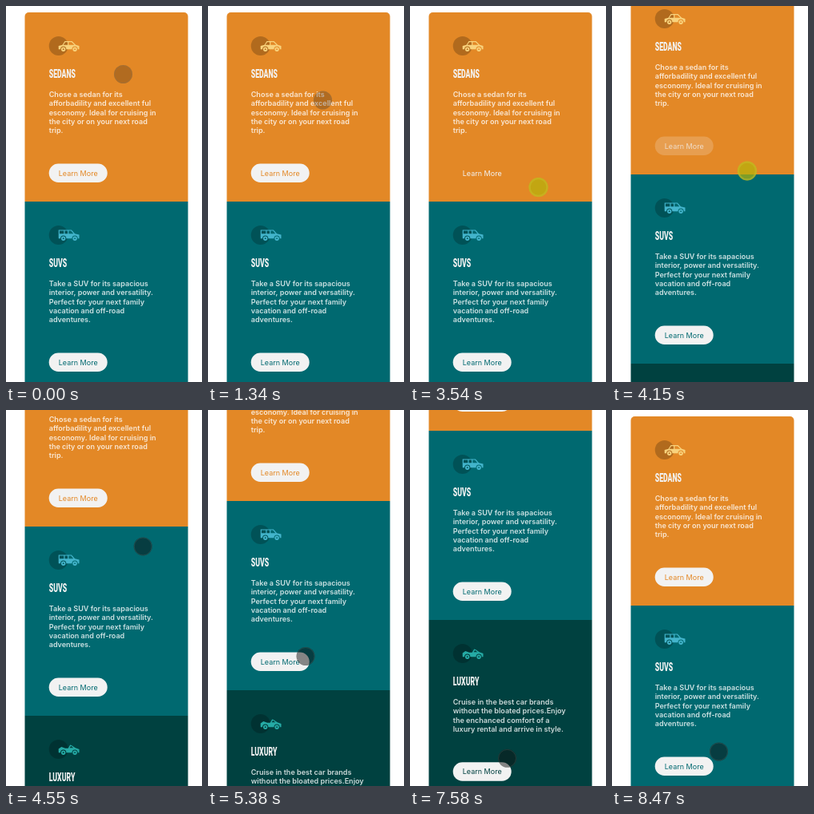
Recreate the animation shown at these times as an HTML page with a canvas. Size 245x471 px, loop 8.6 s.

```html
<!DOCTYPE html>
<html lang="en">
<head>
<meta charset="utf-8">
<title>Car cards</title>
<style>
  html, body { margin: 0; width: 100%; height: 100%; overflow: hidden; background: #fff; }
  canvas { display: block; width: 245px; height: 471px; }
</style>
</head>
<body>
<canvas id="stage"></canvas>
<script>
const W = 245, H = 471, LOOP = 8600;
const LEFT = 23.5, CARD_W = 204, PAD = 53.7, LINE = 11.25;
const BUTTON_W = 73, BUTTON_H = 23.5;
const LIGHT = [242, 242, 242];

const canvas = document.getElementById('stage');
const ctx = canvas.getContext('2d');
const dpr = window.devicePixelRatio || 1;
canvas.width = W * dpr;
canvas.height = H * dpr;

// Lower edge of a car body with two wheel arches
const ARCHES = 'V27H60A6 6 0 0 0 48 27H36A6 6 0 0 0 24 27H20Z';

// hover and tap hold the times at which each state begins and ends
const cards = [
  {
    title: 'SEDANS', rgb: [227, 136, 38], icon: '#f8d27c',
    lines: ['Chose a sedan for its', 'afforbadility and excellent ful',
      'esconomy. Ideal for cruising in', 'the city or on your next road', 'trip.'],
    body: 'M20 27V20L28 18L33 10H48L56 18L63 20' + ARCHES +
      'M30 18L34 12H39V18ZM41 12H47L53 18H41Z',
    hover: [2545, 4090], tap: [2400, 2660]
  },
  {
    title: 'SUVS', rgb: [0, 105, 112], icon: '#43b4cb',
    lines: ['Take a SUV for its sapacious', 'interior, power and versatility.',
      'Perfect for your next family', 'vacation and off-road', 'adventures.'],
    body: 'M20 27V9H47L54 17L63 19' + ARCHES +
      'M22 11H31V17H22ZM33 11H39V17H33ZM41 11H46L51 17H41Z',
    hover: [5720, 6180], tap: [5600, 5800]
  },
  {
    title: 'LUXURY', rgb: [0, 65, 64], icon: '#25aaa5',
    lines: ['Cruise in the best car brands', 'without the bloated prices.Enjoy',
      'the enchanced comfort of a', 'luxury rental and arrive in style.'],
    body: 'M20 27V19L26 15L34 18H40L44 11L47 11.5L55 17L63 20' + ARCHES +
      'M43 17L46 13L51 17Z'
  }
];

let nextTop = 8;
for (const card of cards) {
  card.path = new Path2D(card.body);
  card.top = nextTop;
  card.height = 180.75 + card.lines.length * LINE;
  nextTop += card.height;
}

// Pointer moves: start, end, x, y
const HOME = [146.5, 85.5];
const moves = [
  [400, 780, 89, 56], [780, 1140, 151, 136], [1270, 1340, 143.5, 118],
  [1540, 1870, 115.5, 209.5], [2760, 3200, 160.5, 227], [3540, 3760, 165, 255],
  [3760, 4480, 172, 169], [4500, 5240, 114.5, 312], [5310, 5380, 122, 308.5],
  [5780, 5980, 153, 305], [5980, 6540, 156, 191], [6560, 7060, 153, 272],
  [7360, 7620, 119.5, 447], [8260, 8470, 133.5, 428]
];
const presses = [[2200, 2760], [3330, 4480], [5580, 5780], [5980, 6540], [7720, 7860]];
const RELOAD = 7900;

const ramp = (t, from, to) => Math.min(1, Math.max(0, (t - from) / (to - from)));
const ease = (t, from, to) => {
  const k = ramp(t, from, to);
  return k * k * (3 - 2 * k);
};
const pulse = (t, span, rise, fall) => span
  ? ramp(t, span[0], span[0] + rise) - ramp(t, span[1], span[1] + fall) : 0;
const mix = (a, b, k) => `rgb(${a.map((v, i) => Math.round(v + (b[i] - v) * k)).join()})`;

// Two swipes, then the page starts over at the top
const scrollAt = t => t < RELOAD
  ? 131 * ease(t, 3760, 4928) + 88 * ease(t, 6060, 6475) : 0;

function pointerAt(t) {
  let [x, y] = HOME;
  for (const [from, to, toX, toY] of moves) {
    const k = ease(t, from, to);
    x += (toX - x) * k;
    y += (toY - y) * k;
  }
  return [x, y];
}

function disc(x, y, r, fill) {
  ctx.beginPath();
  ctx.arc(x, y, r, 0, Math.PI * 2);
  ctx.fillStyle = fill;
  ctx.fill();
}

function ring(x, y, r, width, stroke) {
  ctx.beginPath();
  ctx.arc(x, y, r, 0, Math.PI * 2);
  ctx.lineWidth = width;
  ctx.strokeStyle = stroke;
  ctx.stroke();
}

function drawIcon(card, y) {
  ctx.save();
  ctx.translate(PAD, y);
  ctx.scale(0.6, 0.6);
  disc(20, 20, 20, 'rgba(0,0,0,.22)');
  ctx.fillStyle = card.icon;
  ctx.fill(card.path, 'evenodd');
  for (const x of [30, 54]) ring(x, 27, 3, 3, card.icon);
  ctx.restore();
}

function drawTitle(text, y) {
  ctx.save();
  ctx.translate(PAD, y);
  ctx.scale(0.58, 1);
  ctx.font = '900 15px Roboto, sans-serif';
  ctx.fillStyle = mix(LIGHT, LIGHT, 0);
  ctx.fillText(text, 0, 0);
  ctx.restore();
}

function drawButton(card, y, t) {
  const hover = pulse(t, card.hover, 240, 300);
  const tap = pulse(t, card.tap, 120, 120);
  ctx.beginPath();
  ctx.roundRect(PAD, y, BUTTON_W, BUTTON_H, BUTTON_H / 2);
  ctx.fillStyle = `rgba(242,242,242,${1 - hover})`;
  ctx.fill();
  ctx.font = '400 9px Inter, sans-serif';
  ctx.fillStyle = mix(card.rgb, LIGHT, hover);
  ctx.textAlign = 'center';
  ctx.fillText('Learn More', PAD + BUTTON_W / 2, y + 15.2);
  ctx.textAlign = 'left';
  ctx.fillStyle = `rgba(51,181,229,${0.4 * tap})`;
  ctx.fillRect(PAD, y, BUTTON_W + 1, BUTTON_H);
}

function drawCard(card, t) {
  const { top, height, rgb, lines } = card;
  const corner = card === cards[0] ? 5 : 0;
  ctx.beginPath();
  ctx.roundRect(LEFT, top, CARD_W, height, [corner, corner, 0, 0]);
  ctx.fillStyle = mix(rgb, rgb, 0);
  ctx.fill();
  drawIcon(card, top + 30);
  drawTitle(card.title, top + 82.2);
  ctx.font = '600 9.05px Inter, sans-serif';
  ctx.fillStyle = 'rgba(255,255,255,.8)';
  lines.forEach((line, i) => ctx.fillText(line, PAD, top + 106 + i * LINE));
  drawButton(card, top + 133.25 + lines.length * LINE, t);
}

function drawPointer(t) {
  const [x, y] = pointerAt(t);
  if (presses.some(([from, to]) => t >= from && t < to)) {
    disc(x, y, 12, 'rgba(180,180,10,.7)');
    ring(x, y, 11, 2.4, 'rgba(205,195,50,.4)');
  } else {
    disc(x, y, 11.5, `rgba(15,15,15,${0.23 + 0.25 * ramp(t, 3500, 4500)})`);
    ring(x, y, 11, 1, 'rgba(120,125,115,.25)');
  }
}

function draw(t) {
  ctx.setTransform(dpr, 0, 0, dpr, 0, 0);
  ctx.fillStyle = '#fff';
  ctx.fillRect(0, 0, W, H);
  ctx.save();
  ctx.translate(0, -Math.round(scrollAt(t)));
  for (const card of cards) drawCard(card, t);
  ctx.restore();
  drawPointer(t);
}

const start = performance.now();
function tick() {
  draw((performance.now() - start) % LOOP);
  requestAnimationFrame(tick);
}
tick();
</script>
</body>
</html>
```
